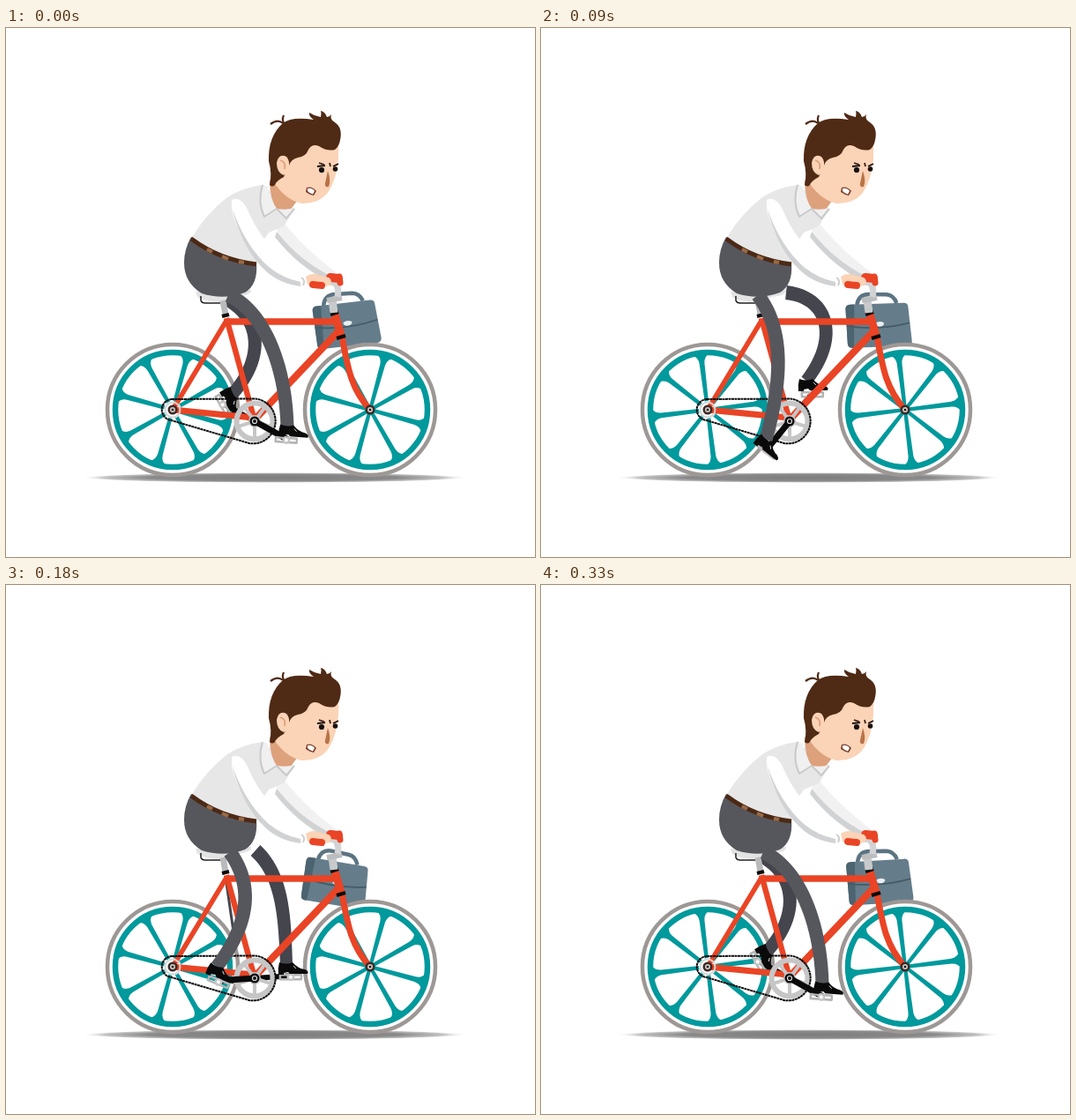
Write an HTML page with a canvas that moves like this. It is 600 px wide and 600 px high and loops after 0.36 s.

```html
<!DOCTYPE html>
<html lang="en">
<head>
<meta charset="utf-8">
<title>Cyclist</title>
<style>
html, body { margin: 0; width: 100%; height: 100%; overflow: hidden; background: #fff; }
canvas { display: block; width: 600px; height: 600px; }
</style>
</head>
<body>
<canvas id="stage" width="600" height="600"></canvas>
<script>
const ctx = document.getElementById('stage').getContext('2d');
const TAU = Math.PI * 2, RAD = Math.PI / 180;
const STEP = 30, STEPS = 12;
const RED = '#e94425', TEAL = '#00999c', TYRE = '#9d9895', STEEL = '#c6c6c7', BLACK = '#0b0a0b';
const TROUSER = '#56575d', TROUSER_DARK = '#44454d', HAIR = '#4f2a15', SKIN = '#fbd3b6';
const SHIRT = '#e7e7e8', SHIRT_SHADE = '#d1d2d3', SKIN_SHADE = '#dda17c';
const REAR = [189, 433], FRONT = [413, 433], CRANK = [282, 446], CRANK_LENGTH = 41;
const SPOKES = 8, SPOKE_TURN = 22.5;

// Each leg: hip, two curve handles, ankle, then the tilt of the shoe. A pose lasts two steps.
const POSES = [
  { crank: 29, near: [252, 303, 291, 320, 317, 380, 319, 452, 4], far: [252, 308, 290, 330, 293, 375, 257, 415, 60] },
  { crank: 100, near: [244, 303, 250, 350, 258, 410, 269, 474, 0], far: [270, 302, 318, 300, 335, 355, 286, 389, 0] },
  { crank: 129, near: [246, 303, 278, 345, 272, 405, 255, 467, 38], far: [278, 300, 325, 305, 340, 350, 301, 400, 0] },
  { crank: 176, near: [254, 303, 284, 345, 272, 390, 239, 433, 22], far: [283, 301, 315, 330, 316, 380, 318, 430, 0] },
  { crank: 212, near: [254, 303, 306, 315, 310, 385, 240, 407, 25], far: [266, 315, 275, 360, 285, 410, 307, 456, -22] },
  { crank: 342, near: [256, 303, 300, 318, 324, 372, 315, 422, 4], far: [262, 310, 264, 360, 264, 410, 242, 446, 35] }
];
const BAG_TILT = [-6.5, -9.5, -6, -2, 2.5, 7, 9.5, 9, 5, 1.5, -1, -3.5];

function fill(path, color) {
  ctx.fillStyle = color;
  ctx.fill(new Path2D(path));
}

function line(path, color, width, cap = 'butt') {
  ctx.strokeStyle = color;
  ctx.lineWidth = width;
  ctx.lineCap = cap;
  ctx.lineJoin = 'round';
  ctx.stroke(new Path2D(path));
}

function ring(x, y, r, color, width) {
  ctx.beginPath();
  ctx.arc(x, y, r, 0, TAU);
  ctx.strokeStyle = color;
  ctx.lineWidth = width;
  ctx.stroke();
}

function disc(x, y, r, color) {
  ctx.beginPath();
  ctx.arc(x, y, r, 0, TAU);
  ctx.fillStyle = color;
  ctx.fill();
}

function placed(x, y, degrees, draw) {
  ctx.save();
  ctx.translate(x, y);
  ctx.rotate(degrees * RAD);
  draw();
  ctx.restore();
}

function shadow() {
  ctx.save();
  ctx.translate(304, 510);
  ctx.scale(1, 0.027);
  const g = ctx.createRadialGradient(0, 0, 0, 0, 0, 220);
  g.addColorStop(0, '#7d7d7d');
  g.addColorStop(0.65, '#8a8a8a');
  g.addColorStop(0.88, '#c4c4c4');
  g.addColorStop(1, 'rgba(255,255,255,0)');
  ctx.fillStyle = g;
  ctx.fillRect(-220, -220, 440, 440);
  ctx.restore();
}

function wheel([x, y], turn) {
  ring(x, y, 71, '#fff', 8);
  ring(x, y, 74, TYRE, 4.5);
  ring(x, y, 65, TEAL, 6.5);
  for (let i = 0; i < SPOKES; i++) {
    placed(x, y, i * 360 / SPOKES + turn, () =>
      fill('M-2 0L-2.9-53Q-3.5-60-9-62.5L9-62.5Q3.5-60 2.9-53L2 0Z', TEAL));
  }
}

function bag(tilt) {
  placed(372.5, 291, tilt, () => {
    line('M-15 23Q-13 10 0 11L19 12Q27 13 30 22', '#5c7482', 4.5);
    fill('M-23 22L38 22Q43 22 43 27L46 66Q46 71 41 71L-21 71Q-27 71-27 66L-28 27Q-28 22-23 22Z', '#657d8b');
    fill('M-23 22L-18 22L-20 71L-22 71Q-27 71-27 66L-28 27Q-28 22-23 22Z', '#4c6370');
    line('M-27 46Q8 53 44 45', '#445b68', 1.8);
    fill('M5 44Q10 41 15 44Q15 48 10 48Q5 48 5 44Z', '#e9eef0');
  });
}

function leg([x0, y0, x1, y1, x2, y2, x3, y3], color, topWidth, endWidth) {
  const left = [], right = [];
  for (let i = 0; i <= 24; i++) {
    const t = i / 24, u = 1 - t;
    const mix = (a, b, c, d) => u * u * u * a + 3 * u * u * t * b + 3 * u * t * t * c + t * t * t * d;
    const slope = (a, b, c, d) => u * u * (b - a) + 2 * u * t * (c - b) + t * t * (d - c);
    const dx = slope(x0, x1, x2, x3), dy = slope(y0, y1, y2, y3);
    const half = (topWidth * u + endWidth * t) / 2 / Math.hypot(dx, dy);
    const x = mix(x0, x1, x2, x3), y = mix(y0, y1, y2, y3);
    left.push([x - dy * half, y + dx * half]);
    right.unshift([x + dy * half, y - dx * half]);
  }
  ctx.beginPath();
  left.concat(right).forEach(p => ctx.lineTo(...p));
  ctx.closePath();
  ctx.fillStyle = color;
  ctx.fill();
}

function shoe(x, y, tilt) {
  placed(x, y, tilt, () => {
    fill('M-8-2Q0 1 7-2Q13 5 21 6Q26 8 24 11L4 11L2 9L-3 10L-3 12L-9 12Q-10 5-8-2Z', BLACK);
    line('M8 2L11 5', '#fff', 0.8);
  });
}

function pedal(x, y, tilt) {
  placed(x, y, tilt, () => {
    ctx.strokeStyle = '#b4b4b5';
    ctx.lineWidth = 2.5;
    ctx.strokeRect(-12, -2, 24, 5);
    disc(0, 0.5, 4.5, '#c4c4c5');
    disc(0, 0.5, 2, '#fff');
  });
}

function side(pose, near) {
  const limb = near ? pose.near : pose.far;
  const angle = (pose.crank + (near ? 0 : 180)) * RAD;
  const x = CRANK[0] + CRANK_LENGTH * Math.cos(angle);
  const y = CRANK[1] + CRANK_LENGTH * Math.sin(angle);
  line(`M${CRANK}L${x} ${y}`, BLACK, near ? 7 : 6, 'round');
  pedal(x, y + 1, limb[8]);
  leg(limb, near ? TROUSER : TROUSER_DARK, 16, near ? 15 : 14);
  shoe(limb[6], limb[7], limb[8]);
}

function bikeFrame() {
  line('M246 309L249 325', '#b9babb', 7);
  line('M189 433L250 332', RED, 5.5);
  line('M189 433L281 442', RED, 7);
  line('M250 329L281 442', RED, 6.5);
  line('M250 333L379 333', RED, 7.5);
  line('M379 342L284 442', RED, 8);
  line('M373 325L381 352', RED, 9);
  line('M381 350C388 388 392 410 413 433', RED, 7);
  line('M368 325L377 322M375 352L385 349', BLACK, 4);
  line('M245 327L253 325', BLACK, 4);
  for (const [x, y] of [REAR, FRONT]) {
    disc(x, y, 5.5, '#3b2a26');
    disc(x, y, 3, '#cfc6c2');
    disc(x, y, 1.3, BLACK);
  }
}

function saddle() {
  fill('M215 299Q245 300 278 297Q279 303 262 305L246 311Q226 311 217 305Z', '#e3e3e4');
  line('M221 304L221 309Q222 312 226 312L243 312', '#222', 1.5);
}

function drivetrain() {
  ring(...CRANK, 20.5, STEEL, 6);
  for (let i = 0; i < 5; i++) {
    placed(...CRANK, i * 72 + 36, () => line('M0 0L0-19', STEEL, 4));
  }
  disc(...CRANK, 7, STEEL);
  ring(...REAR, 8.5, '#d6d6d6', 2);
  ctx.setLineDash([3, 0.5]);
  line('M188 421L283 420.5A25.5 25.5 0 1 1 276 471L184 444A12 12 0 0 1 188 421Z', BLACK, 2);
  ctx.setLineDash([]);
}

function handlebar() {
  line('M372 323L370 308', '#c9cacb', 9);
  line('M364 309L381 306', '#bcbdbe', 6);
  line('M376 305Q379 291 370 288L352 290', '#d2d3d4', 7);
  line('M368 283L377 284', RED, 10, 'round');
  line('M378 282L379 289', RED, 7, 'round');
}

function farArm() {
  fill('M306 219Q315 219 320 227Q343 254 374 277L366 286Q334 269 308 236Z', '#f1f1f2');
  fill('M307 231Q333 264 368 281L365 287Q331 270 305 237Z', SHIRT_SHADE);
}

function torso() {
  fill('M210 237L284 267Q286 291 271 300Q247 309 222 301Q202 289 202 266Q202 251 210 237Z', TROUSER);
  fill('M290 178Q268 181 251 192Q227 211 211 237Q242 261 284 268Q286 247 298 232L315 225L327 205Z', SHIRT);
  line('M210 239Q242 263 284 268', '#4c2915', 5);
  line('M228 251L234 254M245 259L252 262M264 265L270 266', '#9b6a45', 4);
}

function nearArm() {
  fill('M256 195Q266 190 274 206Q288 239 311 258Q324 269 339 280L334 292Q316 288 298 276Q270 253 256 207Z', '#fff');
  fill('M256 203Q271 247 298 271Q314 284 334 288L334 293Q310 290 294 275Q268 251 256 203Z', SHIRT_SHADE);
  line('M335 283Q340 286 337 292', '#cfcfd0', 2);
  fill('M340 282Q347 277 354 280L366 283Q371 286 367 292Q353 295 342 291Z', SKIN);
  line('M348 291L358 292', RED, 8, 'round');
  fill('M345 283Q352 280 364 285L361 288L350 287Z', SKIN);
}

function head(raised) {
  fill('M299 172L331 195L322 207L308 207Q299 195 299 172Z', SKIN_SHADE);
  fill('M315 145L350 127L377 130Q379 167 364 188Q353 200 335 199Q318 195 305 177Z', SKIN);
  const crest = raised
    ? 'Q324 104 349 104Q343 99 346 94Q357 95 361 106Q366 103 363 97Q376 100 381 113Q384 126 376 136'
    : 'Q324 100 349 104Q343 100 344 96Q350 100 357 101Q358 97 357 94Q362 95 364 101Q367 101 369 98Q367 104 373 107Q382 113 379 127Q378 134 373 138';
  fill(`M299 178Q302 165 298 151Q297 123 314 108${crest}Q364 140 355 134Q347 131 343 138Q340 146 331 147Q323 149 321 156L315 169Q307 173 305 178Q302 181 299 178Z`, HAIR);
  line(raised ? 'M316 109Q312 104 312 99M313 108Q306 113 299 110' : 'M317 110Q312 105 315 99M314 108Q308 103 300 109', HAIR, 2.2);
  fill('M312 145Q319 143 321 152Q322 163 315 167Q307 164 307 153Q308 147 312 145Z', SKIN);
  line('M311 150Q318 152 316 160', SKIN_SHADE, 1.8);
  fill('M365 162Q369 173 366 180Q361 181 362 176Z', '#b87448');
  disc(358, 161, 3.1, '#17100f');
  disc(373.5, 160, 2.8, '#17100f');
  line('M353 157L362 156M371 157L377 154', '#17100f', 1.8);
  line('M355 153L361 155M367 153L368 157', '#3a1d16', 1.8);
  fill('M341 181Q347 179 352 185L349 190Q344 189 340 186Z', '#7a3f2b');
  fill('M342 182Q347 181 350 185L348 188.5Q344 187 342 185Z', '#fff');
}

function collar() {
  fill('M291 177L297 180Q300 196 308 206L294 214Q285 200 291 177Z', '#f0f0f0');
  fill('M307 205Q318 207 327 204L318 216Z', '#f0f0f0');
  line('M291 178Q285 198 293 214L307 205L318 216L327 205', '#c9cacb', 2);
}

function draw(frame) {
  const poseIndex = Math.floor(((frame + 1) % STEPS) / 2);
  const pose = POSES[poseIndex];
  const turn = (frame + 1) * SPOKE_TURN - 7;
  ctx.fillStyle = '#fff';
  ctx.fillRect(0, 0, 600, 600);
  shadow();
  bag(BAG_TILT[frame]);
  wheel(REAR, turn);
  wheel(FRONT, turn);
  disc(...REAR, 10, '#fff');
  saddle();
  side(pose, false);
  if (poseIndex === 3 || poseIndex === 4) line('M250 338L258 393', TROUSER_DARK, 3);
  bikeFrame();
  drivetrain();
  farArm();
  handlebar();
  side(pose, true);
  disc(...CRANK, 5.5, BLACK);
  ring(...CRANK, 2.5, '#ddd', 1.2);
  torso();
  head(poseIndex % 3 === 1);
  collar();
  nearArm();
}

function tick() {
  draw(Math.floor(performance.now() / STEP) % STEPS);
  requestAnimationFrame(tick);
}
tick();
</script>
</body>
</html>
```
